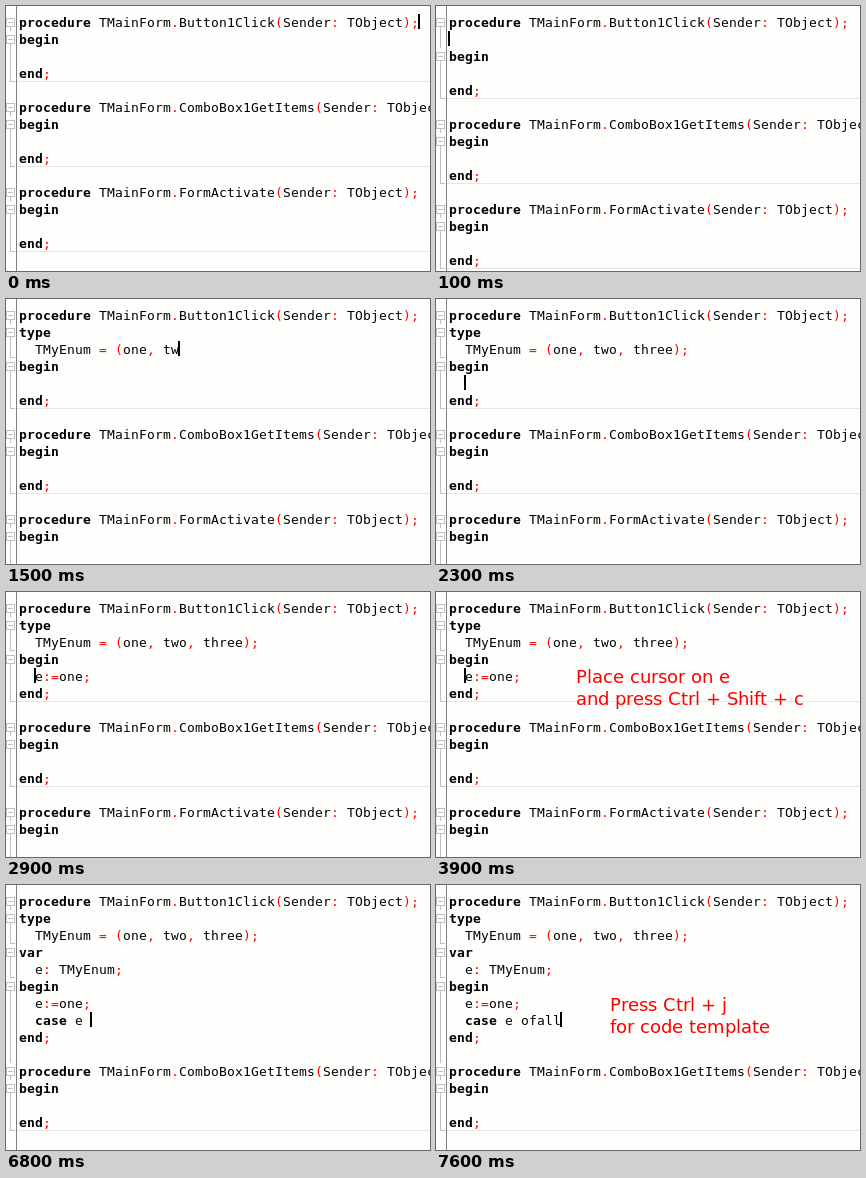
Write an HTML page with a canvas that moves like this. It is 424 by 265 pixels and loops after 8000 ms.

```html
<!DOCTYPE html>
<html lang="en">
<head>
<meta charset="utf-8">
<title>Code editor typing</title>
<style>
  html, body { margin: 0; width: 100%; height: 100%; overflow: hidden; background: #fefefc; }
  canvas { display: block; width: 424px; height: 265px; }
</style>
</head>
<body>
<canvas id="stage" width="424" height="265"></canvas>
<script>
const W = 424, H = 265, LOOP = 8000, TICK = 100;
const TOP = 8, ROW = 17, LEFT = 13, CHAR = 8;
const ctx = document.getElementById('stage').getContext('2d');
const MONO = '13px "DejaVu Sans Mono", monospace';
const NOTE = '18px "DejaVu Sans", sans-serif';
const KEYWORDS = new Set(['procedure', 'begin', 'end', 'type', 'var', 'case', 'of']);

const ENUM = '  TMyEnum = (one, two, three);';
const ASSIGN = '  e:=one;';
const CASE = '  case e ofall';

// Caret column after each tick of typing
const ENUM_COLS = [2, 3, 5, 7, 9, 10, 12, 13, 15, 17, 18, 20, 22, 25, 27, 27, 29, 30];
const ASSIGN_COLS = [4, 4, 6, 8, 9];
const CASE_COLS = [3, 5, 6, 8, 9, 11, 12, 14];

function column(t, start, cols) {
  if (t < start) return 0;
  return cols[Math.min(cols.length - 1, Math.floor((t - start) / TICK))];
}

// Fold marks: B = box, | = line, E = line with end tick
const header = name => ['B', `procedure TMainForm.${name}(Sender: TObject);`];
const emptyProcedure = name =>
  [header(name), ['B', 'begin'], ['|', ''], ['E', 'end;'], [' ', '']];

function scene(t) {
  const enumCol = column(t, 400, ENUM_COLS);
  const assignCol = column(t, 2400, ASSIGN_COLS);
  const caseCol = column(t, 6400, CASE_COLS);
  const caseOpen = caseCol >= 6;
  const lines = [header('Button1Click')];
  let caret = [0, 50];

  if (t >= 300) {
    lines.push(['B', 'type'], ['E', ENUM.slice(0, enumCol)]);
    caret = [2, enumCol];
  } else if (t >= 100) {
    const word = t < 200 ? '' : 'type';
    lines.push(['|', word]);
    caret = [1, word.length];
  }
  if (t >= 5900) lines.push(['B', 'var'], ['E', '  e: TMyEnum;']);
  lines.push(['B', 'begin'], ['|', ASSIGN.slice(0, assignCol)]);
  if (t >= 5900) {
    lines.push(['|', CASE.slice(0, caseCol)]);
    caret = [7, caseCol || 2];
  } else if (t >= 2900) caret = [4, 2];
  else if (t >= 2400) caret = [4, assignCol];
  else if (t >= 2200) caret = [4, t < 2300 ? 0 : 2];

  // An unfinished case swallows the end, so the outer fold stays open
  const after = caseOpen ? '|' : ' ';
  lines.push([caseOpen ? '|' : 'E', 'end;'], [after, '']);
  lines.push(...emptyProcedure('ComboBox1GetItems'), ...emptyProcedure('FormActivate'));
  return { lines, caret };
}

function rect(color, x, y, w, h) {
  ctx.fillStyle = color;
  ctx.fillRect(x, y, w, h);
}

function drawFold(mark, y) {
  const color = '#c0c0c0';
  if (mark === 'B') {
    ctx.strokeStyle = color;
    ctx.lineWidth = 1;
    ctx.strokeRect(0.5, y + 4.5, 8, 8);
    rect(color, 2, y + 8, 5, 1);
    rect(color, 4, y + 13, 1, 4);
  } else if (mark !== ' ') {
    rect(color, 4, y, 1, ROW);
    if (mark === 'E') rect(color, 4, y + ROW - 1, 5, 1);
  }
}

function drawCode(text, y) {
  for (const { 0: token, index } of text.matchAll(/\w+|[^\w\s]/g)) {
    ctx.font = (KEYWORDS.has(token) ? 'bold ' : '') + MONO;
    ctx.fillStyle = /\w/.test(token) ? '#000' : '#f00';
    [...token].forEach((ch, i) => ctx.fillText(ch, LEFT + (index + i) * CHAR, y + 13));
  }
}

// Whole-pixel advances, like hinted screen text
function drawNote(x, y, ...rows) {
  ctx.font = NOTE;
  ctx.fillStyle = '#f00';
  rows.forEach((row, i) => {
    let pen = x;
    for (const ch of row) {
      ctx.fillText(ch, pen, y + i * 22);
      pen += Math.round(ctx.measureText(ch).width);
    }
  });
}

function draw(t) {
  const { lines, caret } = scene(t);
  rect('#fefefc', 0, 0, W, H);
  lines.forEach(([mark, text], i) => {
    const y = TOP + i * ROW;
    if (y >= H) return;
    drawFold(mark, y);
    if (mark === 'E' && text === 'end;') rect('#e6e6e6', 11, y + ROW - 1, W, 1);
    drawCode(text, y);
  });
  rect('#808080', 10, 0, 1, H);
  rect('#000', LEFT - 1 + caret[1] * CHAR, TOP + caret[0] * ROW, 2, 15);
  if (t >= 3900 && t < 5900) drawNote(140, 91, 'Place cursor on e', 'and press Ctrl + Shift + c');
  if (t >= 7600) drawNote(174, 126, 'Press Ctrl + j', 'for code template');
}

function loop() {
  draw(performance.now() % LOOP);
  requestAnimationFrame(loop);
}
loop();
</script>
</body>
</html>
```
